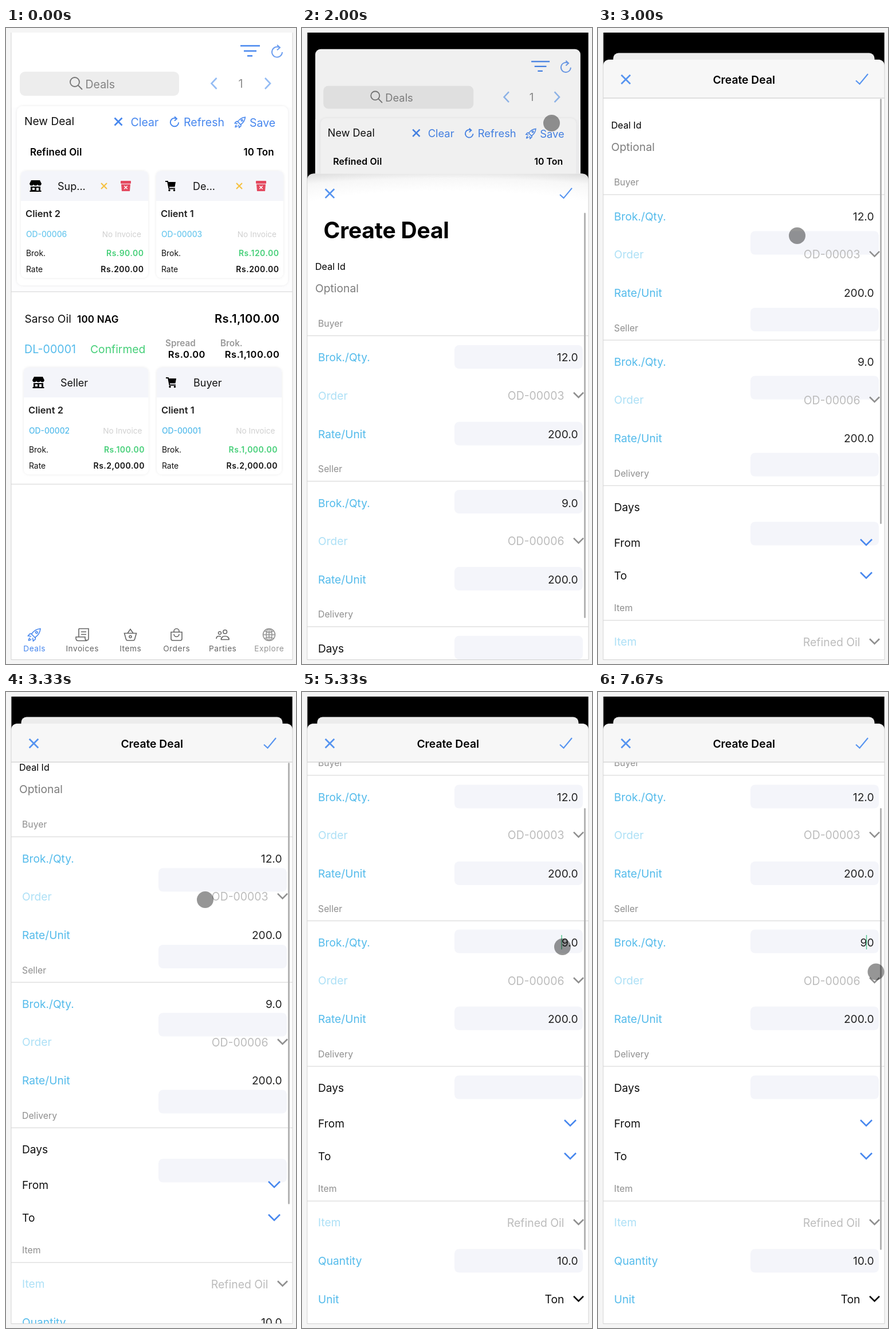
Animation, 506 px wide and 1107 px high, one loop 8 s. Source, as an HTML page:

```html
<!DOCTYPE html>
<html lang="en">
<head>
<meta charset="utf-8">
<title>Create Deal</title>
<style>
  html, body { margin: 0; width: 100%; height: 100%; overflow: hidden; background: #f5f5f5; }
  svg { display: block; width: 506px; height: 1107px; font-family: Inter, Roboto, sans-serif; }
</style>
</head>
<body>
<svg id="stage" viewBox="0 0 506 1107"></svg>
<script>
const LOOP = 8000, STEP = 1000 / 3;
const BLUE = '#4787ee', SKY = '#54bbeb', PALE_SKY = '#ade0f6', GREEN = '#45cf78';
const BLACK = '#111', GREY = '#8f8f8f', PALE = '#bcbcbc', TINT = '#f4f5fa';
const SCROLL = [0, 47, 85, 149, 167, 192];

const ICONS = {
  refresh: 'M21 13A9 9 0 1 1 16 4.7M12 0.5L17 5 12 9.5',
  rocket: 'M22.5 1.5C16 2 11 5 7 11L13 17C19 13 22 8 22.5 1.5ZM8 10L4 10.5 1 14 6.5 15M14 16L13.5 20 10 23 9 17.5M4.5 17.5Q2 19 2 22 5 22 6.5 19.5M17.5 8a1.7 1.7 0 1 0-3.4 0a1.7 1.7 0 1 0 3.4 0',
  receipt: 'M6 1.5H23V18C23 23 17 23 17 18V16H1V18Q1 22.5 5 22.5H20M6 1.5V16M10 7H19M10 11.5H19',
  basket: 'M1.5 9.5H22.5L19.5 20Q19 22 17 22H7Q5 22 4.5 20ZM7 9.5L12 2.5 17 9.5M14 15.5a2 2 0 1 0-4 0a2 2 0 1 0 4 0',
  bag: 'M2.5 7.5H21.5V19Q21.5 22 18.5 22H5.5Q2.5 22 2.5 19ZM7.5 7.5V6a4.5 4.5 0 0 1 9 0V7.5M7.5 11a4.5 4.5 0 0 0 9 0',
  people: 'M19.5 7a3.3 3.3 0 1 0-6.6 0a3.3 3.3 0 1 0 6.6 0M9.5 9a2.5 2.5 0 1 0-5 0a2.5 2.5 0 1 0 5 0M9.5 20.5C9 12.5 23.5 12.5 23 20.5ZM1 19C1 14.5 5.5 13.5 9 15.5',
  globe: 'M22.5 12a10.5 10.5 0 1 0-21 0a10.5 10.5 0 1 0 21 0M17 12a5 10.5 0 1 0-10 0a5 10.5 0 1 0 10 0M12 1.5V22.5M1.5 12H22.5M4.5 5.5Q12 10 19.5 5.5M4.5 18.5Q12 14 19.5 18.5'
};

// y is the vertical middle of the capitals
const text = (str, x, y, size, fill = BLACK, weight = 400, anchor = 'start', spacing = 0) =>
  `<text x="${x}" y="${y + size * 0.364}" font-size="${size}" fill="${fill}" font-weight="${weight}" text-anchor="${anchor}" letter-spacing="${spacing}">${str}</text>`;
const rect = (x, y, w, h, fill, r = 0, extra = '') =>
  `<rect x="${x}" y="${y}" width="${w}" height="${h}" rx="${r}" fill="${fill}" ${extra}/>`;
const line = (d, color, width = 2) =>
  `<path d="${d}" fill="none" stroke="${color}" stroke-width="${width}"/>`;
const rule = (y, color = '#dedede') => rect(9, y - 0.7, 491, 1.4, color);
const cross = (x, y, r, color, width) =>
  line(`M${x - r} ${y - r}l${2 * r} ${2 * r}m0 ${-2 * r}l${-2 * r} ${2 * r}`, color, width);
const chevron = (x, y, r, color) => line(`M${x - r} ${y - r / 2}l${r} ${r}l${r} ${-r}`, color, 2.6);
const icon = (name, x, y, scale, color, width = 1.6) =>
  `<g transform="translate(${x - 12 * scale} ${y - 12 * scale}) scale(${scale})">${line(ICONS[name], color, width / scale)}</g>`;

function store(x, y) {
  return `<path transform="translate(${x} ${y})" fill-rule="evenodd" d="M3 0H18L21 6Q20 9.5 17.5 9.5 15 9.5 14 7.5 13 9.5 10.5 9.5 8 9.5 7 7.5 6 9.5 3.5 9.5 1 9.5 0 6ZM2 11H19V18H20.5V20H.5V18H2ZM5 13V17H9V13ZM12 13V18H16V13Z"/>`;
}

function cart(x, y) {
  return `<g transform="translate(${x} ${y})"><path d="M4 2H18L16.5 10.5H6Z"/>` +
    line('M0 1H4L6.5 13.5H17', '#000', 1.8) + '<circle cx="7" cy="16.5" r="1.7"/><circle cx="15.5" cy="16.5" r="1.7"/></g>';
}

function trash(x, y) {
  return rect(x - 9, y - 9, 18, 5, '#e44a60', 1) +
    `<path d="M${x - 8} ${y - 3}h16l-1 12h-14z" fill="#e44a60"/>` + cross(x, y + 2.5, 2.7, '#fff', 1.5);
}

function card(c) {
  const { x, y, w, editable } = c, left = x + 9, right = x + (editable ? 214 : 210.5);
  const bold = (str, dy, color) => text(str, right + 0.5, y + dy, 14, color, 600, 'end', 0.5);
  return rect(x, y, w, 186, '#fff', 9, 'filter="url(#soft)"') +
    `<path d="M${x} ${y + 52}v-43q0-9 9-9h${w - 18}q9 0 9 9v43z" fill="${TINT}"/>` +
    (c.sell ? store(x + 15, y + 16) : cart(x + 16, y + 17)) +
    text(c.title, x + 64, y + 26.5, 18) +
    (editable ? cross(x + 145, y + 26, 5, '#f6c244', 2.2) + trash(x + 183, y + 26) : '') +
    text(c.sell ? 'Client 2' : 'Client 1', left - 1, y + 74, 16.5, '#222', 600) +
    text(c.order, left, y + 110, 13.8, editable ? '#6cc8ee' : SKY, 500) +
    text('No Invoice', right - 4, y + 110, 13.6, '#d0d0d0', 400, 'end') +
    text('Brok.', left, y + 143, 13.9) + bold(c.brok, 143, GREEN) +
    text('Rate', left, y + 171.3, 13.9) + bold(c.rate, 171.3, BLACK);
}

function page(clearPressed) {
  const tabs = [['Deals', 'rocket', 49.5], ['Invoices', 'receipt', 133], ['Items', 'basket', 217],
    ['Orders', 'bag', 297.5], ['Parties', 'people', 378], ['Explore', 'globe', 459]];
  const tabColor = i => i === 0 ? BLUE : i === 5 ? '#969696' : '#666';
  return rect(9, 8, 491, 1091, '#fff', 10) +
    line('M409 31H443M415 40H437M421 48.5H430', BLUE, 2.4) + icon('refresh', 473, 41, 1, '#6e9ff0', 2) +
    rect(24, 76, 278, 42, '#ededed', 9) +
    line('M128 94a8 8 0 1 0-16 0a8 8 0 1 0 16 0M126 100L133 107', '#777', 1.9) +
    text('Deals', 138.5, 97.5, 19.5, '#838383') +
    line('M367.5 87L358.5 96.5 367.5 106M452 87L461 96.5 452 106', '#94bcf4', 2.6) +
    text('1', 409.5, 97, 20, GREY, 400, 'middle') +
    rect(9, 138, 491, 320, '#fdfdfe') + rect(19, 136, 473, 312, '#fff', 10, 'filter="url(#soft)"') +
    text('New Deal', 32, 162.5, 19.2) +
    (clearPressed ? rect(176, 144, 96, 38, '#929399', 4) : '') +
    cross(196, 163, 6.5, BLUE, 2.8) + text('Clear', 217.5, 163.5, 19.5, BLUE) +
    icon('refresh', 294, 163.5, 0.8, BLUE, 1.9) + text('Refresh', 310, 163.5, 19.5, BLUE) +
    icon('rocket', 408.5, 164, 0.84, BLUE) + text('Save', 425, 165, 19.5, BLUE) +
    text('Refined Oil', 42, 215.5, 16.9, '#000', 600, 'start', 0.15) + text('10 Ton', 467.5, 215.5, 16.9, '#000', 600, 'end') +
    card({ x: 26, y: 249, w: 222, editable: true, sell: true, title: 'Sup...', order: 'OD-00006', brok: 'Rs.90.00', rate: 'Rs.200.00' }) +
    card({ x: 262, y: 249, w: 222, editable: true, title: 'De...', order: 'OD-00003', brok: 'Rs.120.00', rate: 'Rs.200.00' }) +
    rule(459) +
    text('Sarso Oil', 32.5, 506, 19.2) + text('100 NAG', 124, 507, 17, '#000', 600, 'start', 0.2) +
    text('Rs.1,100.00', 477.5, 506, 20.2, '#000', 600, 'end', 0.4) +
    text('DL-00001', 32, 558.5, 19.6, SKY) + text('Confirmed', 147, 558.5, 19.3, GREEN) +
    text('Spread', 278, 548.5, 15.3, '#999', 600) + text('Brok.', 374, 548.5, 15.3, '#999', 600) +
    text('Rs.0.00', 348, 568, 16.5, '#000', 600, 'end', 0.5) + text('Rs.1,100.00', 477.5, 568, 16.5, '#000', 600, 'end', 0.6) +
    card({ x: 31, y: 591, w: 217.5, sell: true, title: 'Seller', order: 'OD-00002', brok: 'Rs.100.00', rate: 'Rs.2,000.00' }) +
    card({ x: 263, y: 591, w: 218, title: 'Buyer', order: 'OD-00001', brok: 'Rs.1,000.00', rate: 'Rs.2,000.00' }) +
    rule(794) +
    tabs.map(([name, glyph, x], i) => icon(glyph, x, 1056, 1, tabColor(i)) +
      text(name, x + 0.2, 1080, 13.7, tabColor(i), 400, 'middle', 0.5)).join('');
}

function form(sellerBrok) {
  const label = (str, y, color = SKY) => text(str, 28, y, 19.2, color);
  const value = (str, y) => text(str, 481.5, y, 19.2, '#222', 400, 'end');
  const choice = (str, y, color = PALE, arrow = GREY) =>
    text(str, 457.5, y, 19.4, color, 400, 'end') + chevron(482.5, y - 1, 8.5, arrow);
  const section = (str, y) => text(str, 28, y, 15.8, GREY) + rule(y + 21.3);
  const party = (title, y, brok, order) => section(title, y) +
    label('Brok./Qty.', y + 59) + value(brok, y + 59) +
    label('Order', y + 125.5, PALE_SKY) + choice(order, y + 125.5) +
    label('Rate/Unit', y + 192.5) + value('200.0', y + 192.5);
  return text('Create Deal', 37.5, 153.5, 39, '#000', 700, 'start', -0.2) +
    text('Deal Id', 23, 216.5, 16.1, '#000') + text('Optional', 23, 254, 19.3, '#7d7d7d') +
    party('Buyer', 315.7, '12.0', 'OD-00003') + party('Seller', 569, sellerBrok, 'OD-00006') +
    section('Delivery', 822.2) + label('Days', 881, BLACK) +
    label('From', 943, BLACK) + chevron(468, 942, 10, BLUE) +
    label('To', 1000.5, BLACK) + chevron(468, 999.5, 10, BLUE) +
    section('Item', 1056.7) + label('Item', 1115.5, PALE_SKY) + choice('Refined Oil', 1115.5) +
    label('Quantity', 1182) + value('10.0', 1182) +
    label('Unit', 1249) + choice('Ton', 1249, BLACK, BLACK);
}

const scrollAt = step => SCROLL[Math.max(0, Math.min(step - 8, 5))];

function sheet(step) {
  const scroll = scrollAt(step), collapsed = scroll > 0;
  // input backgrounds trail the rows by one step
  const inputs = [374, 507.5, 626, 760, 880, 1182]
    .map(y => rect(266, y - 20.5 - scrollAt(step - 1), 224, 41, TINT, 8)).join('');
  const barTop = 59.5 + 0.742 * scroll, barStart = Math.max(123, barTop);
  const caretX = { 16: 453, 18: 464.5, 19: 464.5, 20: 468.5, 23: 468.5 }[step];
  return rect(9, 55, 491, 1100, '#fff', 12) +
    `<path d="M9 122V67q0-12 12-12H488q12 0 12 12V122z" fill="${collapsed ? '#f7f7f7' : 'url(#fade)'}"/>` +
    `<g clip-path="url(#body)">${inputs}<g transform="translate(0 ${-scroll})">${form(step < 22 ? '9.0' : '90')}</g></g>` +
    (caretX ? rect(caretX - 0.7, 423, 1.4, 25, '#4cc38a') : '') +
    (collapsed ? rule(122, '#d4d4d4') + text('Create Deal', 254.7, 90, 19.3, '#000', 600, 'middle') : '') +
    cross(48.5, 89.5, 7.8, '#5593f0', 2.7) + line('M450 91.5L456.5 97.5 471 80', '#5593f0', 2.1) +
    rect(492, barStart, 3, barTop + 769 - barStart, '#b3b3b3', 1.5);
}

function touchAt(step) {
  if (step < 3 || (step > 16 && step < 23)) return null;
  return step < 8 ? [435.5, 165.5] : step < 14 ? [347.5, 361.5] : step < 17 ? [454.5, 443.5] : [485, 487];
}

function render(step) {
  const open = step < 6 ? 0 : step === 6 ? 0.81 : 1;
  const touch = touchAt(step);
  return `<defs>
    <filter id="soft" x="-10%" y="-10%" width="120%" height="120%"><feDropShadow dx="0" dy="0" stdDeviation="2" flood-color="#334" flood-opacity=".09"/></filter>
    <radialGradient id="fade" cx=".5" cy="1" r="1.1"><stop offset=".5" stop-color="#fff"/><stop offset=".8" stop-color="#f7f7f7"/><stop offset="1" stop-color="#dedede"/></radialGradient>
    <clipPath id="screen">${rect(9, 8, 491, 1091, '#fff')}</clipPath>
    <clipPath id="body">${rect(9, 122, 491, 1000, '#fff')}</clipPath></defs>` +
    `<g clip-path="url(#screen)">` + rect(9, 8, 491, 1091, open ? '#000' : '#fff') +
    `<g transform="translate(${9 + 17.5 * open} ${8 + 35.5 * open}) scale(${1 - 0.0713 * open}) translate(-9 -8)">` +
    page(step === 5) + rect(9, 8, 491, 1091, '#000', 10, `opacity="${0.075 * open}"`) + '</g>' +
    (open ? `<g transform="translate(0 ${1045 * (1 - open)})">${sheet(step)}</g>` : '') + '</g>' +
    line('M9 8V1099.5H500V8', '#d3d3d3', 1) +
    (touch ? `<circle cx="${touch[0]}" cy="${touch[1]}" r="14.5" fill="#000" fill-opacity=".41"/>` : '');
}

const stage = document.getElementById('stage');
let shown = -1;
function tick() {
  const time = performance.now() % LOOP;
  const step = Math.floor((time + 4) / STEP) % 24;
  if (step !== shown) stage.innerHTML = render(shown = step);
  requestAnimationFrame(tick);
}
tick();
</script>
</body>
</html>
```
